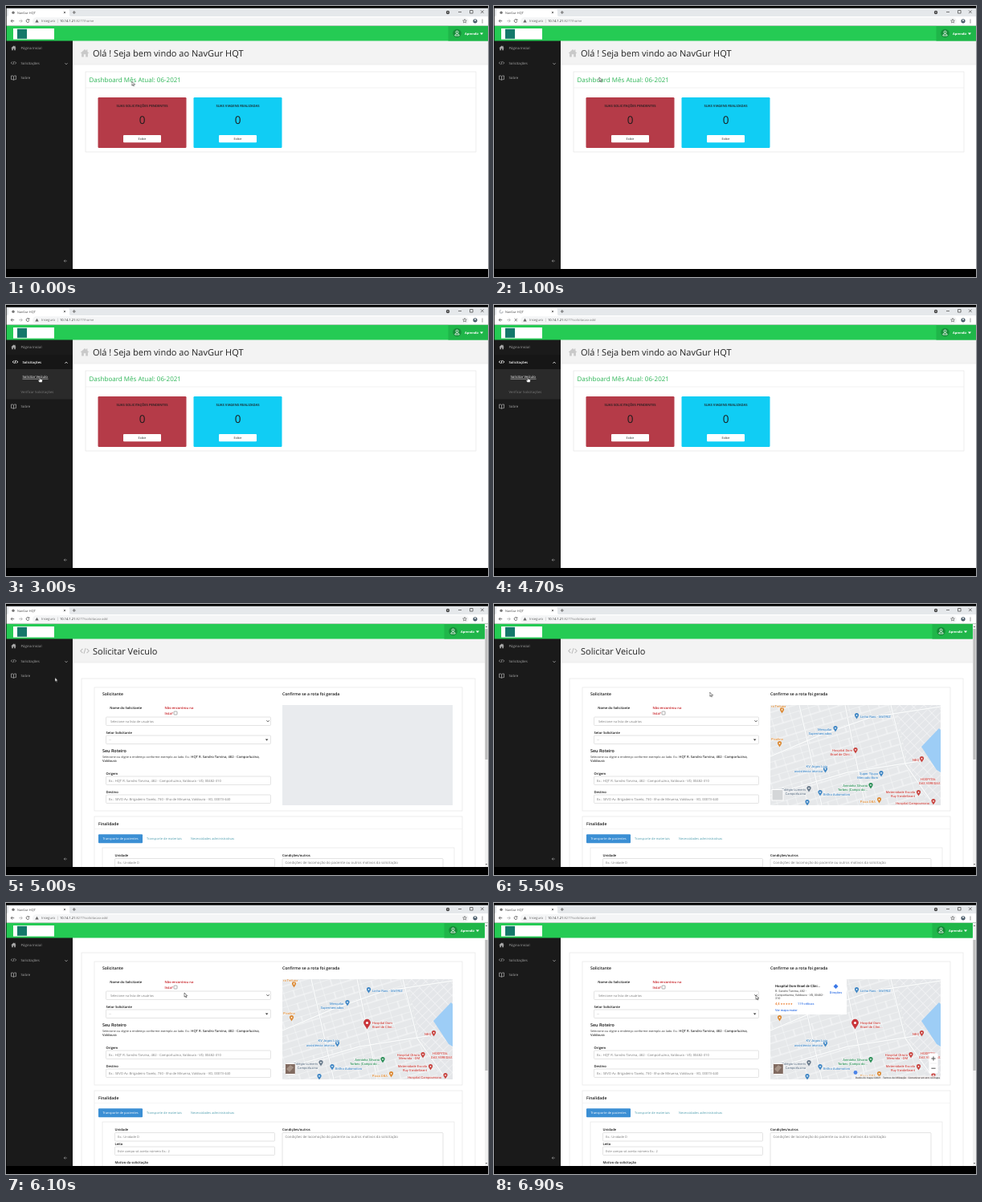
These frames come from a looping animation (600 px wide and 338 px high, 7 s). An HTML page:

```html
<!DOCTYPE html>
<html lang="pt-BR">
<head>
<meta charset="utf-8">
<title>NavGur HQT</title>
<style>
html, body { margin: 0; width: 100%; height: 100%; overflow: hidden; background: #000; }
svg { display: block; width: 600px; height: 338px; }
text { font: 4.3px "Open Sans", "Noto Sans", sans-serif; text-rendering: geometricPrecision; white-space: pre; }
.b { font-weight: 600; }
.mid { text-anchor: middle; }
.end { text-anchor: end; }
.h1 { font-size: 11px; fill: #222; }
.h2 { font-size: 8px; fill: #2cb556; }
.h3 { font-size: 5.1px; font-weight: 600; fill: #111; }
.label { font-size: 4.1px; font-weight: 600; fill: #111; }
.hint { font-size: 3.95px; fill: #777; }
.addr { font-size: 4.12px; }
.tiny { font-size: 3.75px; }
.box { fill: #fff; stroke: #d2d2d2; stroke-width: .6; }
.card { fill: #fff; stroke: #e8e8e8; stroke-width: .8; }
.line { fill: none; stroke: currentColor; stroke-width: .8; }
.map text { font: 500 4.1px Roboto, Arial, sans-serif; stroke: #fff; stroke-width: .6; paint-order: stroke; }
.map .flat text { stroke: none; }
.shop { fill: #3f86c4; } .health { fill: #c8433f; } .food { fill: #dc8a35; }
.park { fill: #2c8f58; } .school { fill: #66788a; }

/* hard state changes */
.home, .open, .rest, .hover, .sub0, .sub1, .load, .idle, .urlA, .urlB, .page, .mapOn,
.near, .far, .info, .ctrl, .hand, .arrow, .sobre, .shift, .user, .down, .up, .under
  { animation: 7s step-end infinite; }
.home { animation-name: home; }
.page { animation-name: page; }
.rest { animation-name: rest; }
.hover { animation-name: hover; }
.open { animation-name: open; }
.sobre { animation-name: sobre; }
.shift { animation-name: shift; }
.under { animation-name: under; }
.down { animation-name: down; }
.up { animation-name: up; }
.sub0 { animation-name: sub0; }
.sub1 { animation-name: sub1; }
.load { animation-name: load; }
.idle { animation-name: idle; }
.urlA { animation-name: urlA; }
.urlB { animation-name: urlB; }
.user { animation-name: user; }
.mapOn { animation-name: mapOn; }
.far { animation-name: far; }
.near { animation-name: near; }
.info { animation-name: info; }
.ctrl { animation-name: ctrl; }
.hand { animation-name: hand; }
.arrow { animation-name: arrow; }
@keyframes home { 0% { visibility: visible } 68.57% { visibility: hidden } }
@keyframes page { 0% { visibility: hidden } 68.57% { visibility: visible } }
@keyframes rest { 0% { visibility: visible } 20% { visibility: hidden } 68.57% { visibility: visible } }
@keyframes hover { 0% { visibility: hidden } 20% { visibility: visible } 68.57% { visibility: hidden } }
@keyframes open { 0% { visibility: hidden } 25.71% { visibility: visible } 68.57% { visibility: hidden } }
@keyframes sobre { 0% { transform: none } 25.71% { transform: translateY(37px) } 68.57% { transform: none } }
@keyframes shift { 0% { transform: translateX(2px) } 48.57% { transform: none } }
@keyframes under { 0% { visibility: hidden } 20% { visibility: visible } 31.42% { visibility: hidden } }
@keyframes down { 0% { visibility: hidden } 20% { visibility: visible } 27.14% { visibility: hidden } }
@keyframes up { 0% { visibility: hidden } 27.14% { visibility: visible } 68.57% { visibility: hidden } }
@keyframes sub0 { 0% { visibility: hidden } 25.71% { visibility: visible } 34.28% { visibility: hidden } }
@keyframes sub1 { 0% { visibility: hidden } 34.28% { visibility: visible } 68.57% { visibility: hidden } }
@keyframes load { 0% { visibility: hidden } 48.57% { visibility: visible } 71.42% { visibility: hidden } }
@keyframes idle { 0% { visibility: visible } 48.57% { visibility: hidden } 71.42% { visibility: visible } }
@keyframes urlA { 0% { visibility: visible } 48.57% { visibility: hidden } }
@keyframes urlB { 0% { visibility: hidden } 48.57% { visibility: visible } }
@keyframes user { 0% { transform: none } 68.57% { transform: translateX(-5px) } }
@keyframes mapOn { 0% { visibility: hidden } 74.28% { visibility: visible } }
@keyframes far { 0% { visibility: hidden } 74.28% { visibility: visible } 84.28% { visibility: hidden } }
@keyframes near { 0% { visibility: hidden } 84.28% { visibility: visible } }
@keyframes info { 0% { visibility: hidden } 91.42% { visibility: visible } }
@keyframes ctrl { 0% { visibility: hidden } 94.28% { visibility: visible } }
@keyframes hand { 0% { visibility: hidden } 18.57% { visibility: visible } 70% { visibility: hidden } }
@keyframes arrow { 0% { visibility: visible } 18.57% { visibility: hidden } 70% { visibility: visible } }

/* motion */
.scroll { animation: scroll 7s ease-out infinite; }
@keyframes scroll { 0%, 81.42% { transform: none } 84.28%, 100% { transform: translateY(-31px) } }
.thumb { animation: thumb 7s ease-out infinite; }
@keyframes thumb { 0%, 81.42% { transform: none } 84.28%, 100% { transform: translateY(15px) } }
.spin { transform-box: fill-box; transform-origin: center; animation: spin .9s linear infinite; }
@keyframes spin { to { transform: rotate(360deg) } }
.cursor { animation: move 7s ease-in-out infinite; }
@keyframes move {
  0%, 11.43% { transform: translate(156.5px, 94px) }
  20%, 24.5% { transform: translate(47px, 72px) }
  35.71%, 70% { transform: translate(42px, 90px) }
  77.14%, 81.42% { transform: translate(268.5px, 110px) }
  87.14%, 88.5% { transform: translate(222px, 112px) }
  95.71%, 97.2% { transform: translate(326px, 113px) }
  98.57%, 100% { transform: translate(326px, 115px) }
}
</style>
</head>
<body>
<svg viewBox="0 0 600 338">
<defs>
  <clipPath id="view"><rect x="83" y="43" width="513" height="285"/></clipPath>
  <clipPath id="mapBox"><rect x="344" y="126" width="212" height="125"/></clipPath>
  <pattern id="blocks" width="24" height="17" patternUnits="userSpaceOnUse" patternTransform="rotate(-17)">
    <path d="M0 0H24M0 0V17M13 0V9M0 9H24" fill="none" stroke="#f8f9fa" stroke-width="1"/>
  </pattern>
  <pattern id="slant" width="11" height="7" patternUnits="userSpaceOnUse" patternTransform="rotate(-44)">
    <rect width="11" height="7" fill="#e4e6e9"/>
    <path d="M0 0H11M0 0V7" stroke="#f8f9fa" stroke-width="1.2"/>
  </pattern>
  <g id="pin">
    <path d="M0 3.6C-.7 1.9-2.6 0-2.6-1.3a2.6 2.6 0 0 1 5.2 0C2.6 0 .7 1.9 0 3.6Z"/>
    <circle cy="-1.2" r=".9" fill="#fff"/>
  </g>
  <path id="roads" d="M344 190L405 164 470 141 556 128M380 126L408 251M344 238L440 210 530 196M437 126L462 251M494 126L512 200 548 251" fill="none"/>
  <path id="house" d="M0-5L-5.4 0h1.5V4.6H-1.2V1.2H1.2V4.6H3.9V0H5.4L3.4-1.9V-4.4H2V-3.2Z"/>
  <path id="code" d="M-2-2L-4 0-2 2M2-2L4 0 2 2M.8-2.6L-.8 2.6" fill="none"/>
  <path id="chev" d="M-1.5-.7L0 .8 1.5-.7" fill="none" stroke-width=".9"/>
</defs>

<rect width="600" height="338"/>
<rect y="43" x="83" width="517" height="285" fill="#fff"/>

<!-- dashboard -->
<g class="home">
  <rect x="83" y="43" width="517" height="30" fill="#f3f3f3"/>
  <path d="M83 73H600" stroke="#e4e4e4" stroke-width=".6"/>
  <use href="#house" x="98" y="59" fill="#c9c9c9"/>
  <text class="h1" x="108" y="63">Olá ! Seja bem vindo ao NavGur HQT</text>
  <rect class="card" x="99" y="82" width="486" height="100"/>
  <path d="M99 102H585" stroke="#e9e9e9" stroke-width=".6"/>
  <text class="h2" x="103.5" y="95">Dashboard Mês Atual: 06-2021</text>
  <rect x="114.5" y="114" width="110" height="63" rx="1.2" fill="#b53b48"/>
  <rect x="233.5" y="114" width="110" height="63" rx="1.2" fill="#10cdf4"/>
  <g class="mid" fill="#1c1c1c">
    <text class="b" x="169.5" y="126" style="font-size:4.15px">SUAS SOLICITAÇÕES PENDENTES</text>
    <text class="b" x="288.5" y="126" style="font-size:4.15px">SUAS VIAGENS REALIZADAS</text>
    <text x="169.5" y="146.8" style="font-size:13.5px">0</text>
    <text x="288.5" y="146.8" style="font-size:13.5px">0</text>
    <rect x="146" y="161" width="47" height="9.2" rx="1" fill="#fff"/>
    <rect x="265" y="161" width="47" height="9.2" rx="1" fill="#fff"/>
    <text class="tiny" x="169.5" y="167">Exibir</text>
    <text class="tiny" x="288.5" y="167">Exibir</text>
  </g>
</g>

<!-- request form -->
<g class="page">
  <g clip-path="url(#view)"><g class="scroll">
    <rect x="83" y="43" width="513" height="30" fill="#f3f3f3"/>
    <path d="M83 73H596" stroke="#e4e4e4" stroke-width=".6"/>
    <use href="#code" transform="translate(98 58.5) scale(1.3)" stroke="#bbb" stroke-width=".8"/>
    <text class="h1" x="108" y="63">Solicitar Veiculo</text>
    <rect class="card" x="94" y="93" width="490" height="320"/>
    <rect class="card" x="110" y="104" width="458" height="154"/>
    <rect class="card" x="110" y="265" width="458" height="140"/>

    <text class="h3" x="120" y="114">Solicitante</text>
    <text class="label" x="129.3" y="130.5">Nome do Solicitante</text>
    <text class="label" x="197.6" y="130.5" style="fill:#c4161c">Não encontrou na</text>
    <text class="label" x="197.6" y="137.5" style="fill:#c4161c">lista?</text>
    <rect x="209" y="134" width="4" height="4" rx=".6" fill="#fff" stroke="#777" stroke-width=".6"/>
    <rect class="box" x="124.5" y="141" width="205" height="10.5" rx="1"/>
    <text class="hint" x="130" y="148">Selecione na lista de usuários</text>
    <use href="#chev" x="326" y="146" stroke="#333"/>
    <text class="label" x="124.5" y="161.5">Setor Solicitante</text>
    <rect class="box" x="124.5" y="164" width="205" height="10.5" rx="1"/>
    <text class="hint" x="128" y="170">...</text>
    <path d="M322.8 168.6h3.6l-1.8 2z" fill="#333"/>
    <text class="h3" x="120" y="184.8" style="font-size:5.4px">Seu Roteiro</text>
    <text class="tiny" x="120" y="191.5" fill="#333">Selecione ou digite o endereço conforme exemplo ao lado. Ex.: <tspan class="b addr">HQT R. Sandro Tarvina, 482 - Camporluzina,</tspan></text>
    <text class="addr b" x="120" y="196.5" fill="#333">Valdoura</text>
    <text class="label" x="124.5" y="212.5">Origem</text>
    <rect class="box" x="124.5" y="215" width="205" height="10.5" rx="1"/>
    <text class="hint addr" x="128" y="221.7">Ex.: HQT R. Sandro Tarvina, 482 - Camporluzina, Valdoura - VD, 00482-310</text>
    <text class="label" x="124.5" y="235.7">Destino</text>
    <rect class="box" x="124.5" y="238" width="205" height="10.5" rx="1"/>
    <text class="hint addr" x="128" y="244.7">Ex.: SEVO Av. Brigadeiro Tavelo, 730 - Ilha de Miruena, Valdoura - VD, 00073-440</text>

    <text class="h3" x="344" y="114">Confirme se a rota foi gerada</text>
    <rect x="344" y="126" width="212" height="125" fill="#e9ebee"/>
    <g class="mapOn map" clip-path="url(#mapBox)">
      <rect x="344" y="126" width="212" height="125" fill="#e6e8ea"/>
      <rect x="344" y="126" width="212" height="125" fill="url(#blocks)"/>
      <path d="M500 126H556V251H540L514 196Z" fill="url(#slant)"/>
      <use href="#roads" stroke="#d6dade" stroke-width="1.9"/>
      <use href="#roads" stroke="#fafbfb" stroke-width="1.4"/>
      <path d="M532 178L554 155 556 157V210L551 207Z" fill="#9dcdf6"/>
      <g class="food">
        <use href="#pin" x="358.5" y="133"/><use href="#pin" x="355.5" y="175"/><use href="#pin" x="479.5" y="245"/>
        <text x="345" y="129">ra Trelupa</text>
        <text x="345" y="170">Picolina</text>
        <text class="end" x="475" y="248">Pizza OBA</text>
      </g>
      <g class="shop">
        <use href="#pin" x="451.5" y="140"/><text x="456" y="142">Linho Raro - MATRIZ</text>
        <use href="#pin" x="425" y="156"/>
        <text class="end" x="420.5" y="158">Merquilar</text><text class="end" x="420.5" y="162.5">Supermercados</text>
        <use href="#pin" x="412.5" y="207"/>
        <text class="end" x="415" y="203.5">KV Jogos Loja</text><text class="end" x="409" y="210">assistência técnica</text>
        <use href="#pin" x="406" y="236"/><text x="410" y="239">Brilho Automotivo</text>
        <use href="#pin" x="390" y="248"/>
      </g>
      <g class="school">
        <use href="#pin" x="392" y="231"/>
        <text class="end" x="388" y="233">Colégio Lumeris</text><text class="end" x="388" y="237.5">Camporluzina</text>
      </g>
      <g class="park">
        <use href="#pin" x="469" y="227"/>
        <text class="end" x="465" y="228">Areninha Silvano</text><text class="end" x="465" y="232.5">Torbes (Campo do...</text>
      </g>
      <g class="health">
        <use href="#pin" x="532.5" y="194"/><text class="end" x="529" y="195.5">NEQ</text>
        <text x="531" y="220">HOSPITAL</text><text x="529" y="224.5">DAS VEREDAS</text>
        <use href="#pin" x="528.5" y="236"/>
        <text class="end" x="524" y="236">Maternidade Escola</text><text class="end" x="524" y="240.5">Ruy Vandelbrant</text>
        <use href="#pin" x="547" y="247"/><text class="end" x="542" y="249.5">Hospital Campoverano</text>
      </g>
      <g class="far">
        <g class="health">
          <use href="#pin" x="450" y="183"/>
          <text class="end" x="446" y="184">Hospital Dom</text><text class="end" x="446" y="188.5">Brael de Clíni...</text>
        </g>
        <g class="shop"><use href="#pin" x="482" y="212"/>
          <text class="end" x="478" y="213">Super Tijupa</text><text class="end" x="478" y="217.5">Mercado Bom</text>
        </g>
        <rect x="346" y="231.5" width="14" height="13.5" fill="#d4d6d8" stroke="#fff"/>
      </g>
      <g class="near">
        <g class="health">
          <use href="#pin" transform="translate(449.5 182.5) scale(1.7)" fill="#c9353a"/>
          <text x="456" y="182">Hospital Dom</text><text x="456" y="187">Brael de Clíni...</text>
          <use href="#pin" x="519" y="221"/>
          <text class="end" x="515" y="221.5">Hospital Otávio</text><text class="end" x="515" y="226">Merunda - OM</text>
        </g>
        <rect x="347.3" y="231.5" width="13" height="13" rx="1" fill="#806a60" stroke="#fff"/>
        <path d="M349 238l5-5 4 3-5 6z" fill="#a79488"/>
      </g>
      <g class="info flat">
        <rect x="344" y="126" width="95" height="44" fill="#fff"/>
        <text x="350" y="136" fill="#111" style="font-size:4.3px">Hospital Dom Brael de Clíni...</text>
        <g fill="#666">
          <text x="350" y="142" style="font-size:3.7px">R. Sandro Tarvina, 482 -</text>
          <text x="350" y="146.7" style="font-size:3.7px">Camporluzina, Valdoura - VD, 00482-</text>
          <text x="350" y="151.4" style="font-size:3.7px">310</text>
        </g>
        <text x="350" y="158" fill="#e7711b">4,4 <tspan style="font-size:3.4px">★★★★★</tspan></text>
        <g fill="#3b78e7">
          <text x="378" y="158" style="font-size:3.9px">119 críticas</text>
          <text x="350" y="166" style="font-size:3.9px">Ver mapa maior</text>
          <path d="M425.5 132l3 3-3 3-3-3z"/>
          <text class="mid" x="425.5" y="144" style="font-size:3.9px">Direções</text>
        </g>
      </g>
      <g class="ctrl flat">
        <rect x="541.5" y="218.5" width="11" height="25" rx=".8" fill="#fff"/>
        <path d="M543 231H551" stroke="#ddd" stroke-width=".5"/>
        <path d="M544.4 225h5.2M547 222.4v5.2M544.4 237.2h5.2" stroke="#555" stroke-width="1"/>
        <circle cx="450" cy="242.5" r="2.4" fill="#4a83e8"/>
        <rect x="445" y="246.5" width="111" height="4.5" fill="#f5f5f5" opacity=".85"/>
        <text class="end" x="555" y="250" fill="#444" style="font-size:3.1px">Dados do mapa ©2021   Termos de Utilização   Comunicar um erro no mapa</text>
      </g>
    </g>

    <text class="h3" x="115" y="275.5">Finalidade</text>
    <path d="M110 280.5H568" stroke="#eee" stroke-width=".6"/>
    <rect x="115" y="287.2" width="55" height="11" rx="1" fill="#3b8fd4"/>
    <g class="b">
      <text class="hint mid" x="142.5" y="294.2" style="fill:#fff">Transporte de pacientes</text>
    </g>
    <text class="hint" x="175" y="294.2" style="fill:#4c9cad">Transporte de materiais</text>
    <text class="hint" x="230" y="294.2" style="fill:#4c9cad">Necessidades administrativas</text>
    <rect class="card" x="120" y="304" width="438" height="90"/>
    <text class="label" x="135.5" y="315">Unidade</text>
    <rect class="box" x="135.5" y="317.5" width="199" height="10.5" rx="1"/>
    <text class="hint" x="139" y="324.3">Ex.: Unidade D</text>
    <text class="label" x="135.5" y="332.7">Leito</text>
    <rect class="box" x="135.5" y="335" width="199" height="10.5" rx="1"/>
    <text class="hint" x="139" y="341.8">Este campo só aceita número Ex.: 2</text>
    <text class="label" x="135.5" y="356">Motivo da solicitação</text>
    <text class="label" x="344" y="315">Condições/outros</text>
    <rect class="box" x="344" y="317.5" width="200" height="60" rx="1"/>
    <text class="hint" x="347.5" y="324.3" style="font-size:4.3px">Condições de locomoção do paciente ou outros motivos da solicitação</text>
  </g></g>
</g>

<!-- sidebar -->
<rect y="43" width="83" height="285" fill="#1a1a1a"/>
<g fill="#a9a9a9">
  <use href="#house" transform="translate(9.5 52.5) scale(.6)"/>
  <text x="18.5" y="54">Página Inicial</text>
</g>
<g class="rest">
  <use href="#code" transform="translate(9.5 71) scale(.8)" stroke="#a9a9a9" stroke-width=".9"/>
  <text x="18.5" y="72.5" fill="#a9a9a9">Solicitações</text>
  <use href="#chev" x="75" y="72" stroke="#a9a9a9"/>
</g>
<g class="hover">
  <rect y="62" width="83" height="18" fill="#161616"/>
  <g class="shift">
    <use href="#code" transform="translate(9.5 71) scale(.8)" stroke="#fff" stroke-width="1.2"/>
    <text class="b" x="18.5" y="72.5" fill="#fff" style="font-size:4.2px">Solicitações</text>
  </g>
</g>
<path class="under" d="M20.5 73.6H45" stroke="#fff" stroke-width=".5"/>
<use class="down" href="#chev" x="75" y="72" stroke="#fff"/>
<use class="up" href="#chev" transform="translate(75 72) scale(1 -1)" stroke="#fff"/>
<g class="open">
  <rect y="80" width="83" height="37.5" fill="#2a2a2a"/>
  <text x="18.5" y="109.5" fill="#7b7b7b">Verificar Solicitações</text>
</g>
<text class="sub0" x="18.5" y="91" fill="#7b7b7b">Solicitar Veículo</text>
<g class="sub1">
  <text x="20.5" y="91" fill="#fff">Solicitar Veículo</text>
  <path d="M20.5 92.2H52.5" stroke="#fff" stroke-width=".5"/>
</g>
<g class="sobre" color="#a9a9a9">
  <path class="line" d="M9.5 87.8C8.5 86.8 7.5 87 6.6 87v4.6c1 0 2 0 2.9.8 .9-.8 1.9-.8 2.9-.8V87c-1 0-2-.2-2.9.8v4.4"/>
  <text x="18.5" y="91" fill="#a9a9a9">Sobre</text>
</g>
<path d="M75.8 318H72.2M73.7 316.5L72.2 318l1.5 1.5" fill="none" stroke="#999" stroke-width=".7"/>

<!-- header -->
<rect y="24.6" width="600" height="18.9" fill="#25cb54"/>
<rect x="9" y="28" width="51" height="13.6" fill="#fff"/>
<rect x="14" y="28.8" width="12" height="12" fill="#14786a"/>
<g class="user">
  <rect x="550.5" y="24.6" width="50" height="18.9" fill="#1fb649"/>
  <circle cx="561.5" cy="34" r="5.3" fill="#178d39"/>
  <circle cx="561.5" cy="32.6" r="1.5" fill="none" stroke="#fff" stroke-width=".8"/>
  <path d="M558.8 37c.3-3 5.1-3 5.4 0z" fill="none" stroke="#fff" stroke-width=".8"/>
  <text x="571" y="35.8" fill="#fff" style="font-size:3.9px;font-weight:700">Aprendiz</text>
  <path d="M590 33.4h4l-2 2.5z" fill="#fff"/>
</g>
<g class="page">
  <rect x="596" y="25" width="4" height="303" fill="#f1f1f1"/>
  <path d="M596.8 29h2.4l-1.2-1.5zM596.8 324h2.4l-1.2 1.5z" fill="#555"/>
  <rect class="thumb" x="596.4" y="31" width="3.2" height="163" fill="#bdbdbd"/>
</g>

<!-- browser -->
<rect y="2.7" width="600" height="10.3" fill="#e5e8eb"/>
<rect y="13" width="600" height="11.7" fill="#fff"/>
<path d="M1 13C2.5 13 3 12 3 11V6Q3 4 5 4H77Q79 4 79 6V11C79 12 79.5 13 81 13Z" fill="#fff"/>
<circle class="idle" cx="9" cy="8.2" r="1.7" fill="#777"/>
<g class="load"><path class="spin" d="M9 6.2a2 2 0 1 1-2 2" fill="none" stroke="#7a8088" stroke-width=".7"/></g>
<text x="14" y="9.7" fill="#444" style="font-size:3.9px">NavGur HQT</text>
<g class="line" color="#555">
  <path d="M71.8 7l2.2 2.2M74 7l-2.2 2.2M82.8 8h4M84.8 6v4"/>
  <path d="M563 7.5h4M577.5 5.5h3.6v3.6h-3.6zM591 5.5l3.6 3.6M594.6 5.5L591 9.1"/>
  <path d="M10.2 18.7H6.2M8 16.8L6.1 18.7 8 20.6"/>
  <path d="M16.2 18.7h4M18.4 16.8l1.9 1.9-1.9 1.9" stroke="#aaa"/>
</g>
<circle cx="550" cy="8" r="2.2" fill="#444"/>
<path d="M549 7.5h2l-1 1.3z" fill="#fff"/>
<path class="idle line" color="#555" d="M28.6 17.4a1.9 1.9 0 1 0 .3 1.7M28.9 16.4v1.4h-1.4"/>
<path class="load line" color="#555" d="M25.6 17l3.2 3.2M28.8 17l-3.2 3.2"/>
<rect x="33" y="14.3" width="543" height="9.4" rx="4.7" fill="#f4f5f6"/>
<path d="M38.5 16.8l2.2 3.8h-4.4z" fill="#666"/>
<text x="44" y="20.3" fill="#666" style="font-size:4.2px">Inseguro</text>
<path d="M64.4 16.5v4.5" stroke="#bbb" stroke-width=".5"/>
<text x="67" y="20.3" fill="#222" style="font-size:4.05px">10.14.1.21<tspan class="urlA" fill="#777">:8277/home</tspan></text>
<text class="urlB" x="67" y="20.3" fill="#777" style="font-size:4.05px"><tspan visibility="hidden">10.14.1.21</tspan>:8277/solicitacao-add</text>
<path class="line" color="#555" style="stroke-width:.6" d="M571 16.4l.7 1.6 1.7.1-1.3 1.1.4 1.7-1.5-.9-1.5.9.4-1.7-1.3-1.1 1.7-.1z"/>
<circle cx="584" cy="18.8" r="2.6" fill="#4b5d6b"/>
<circle cx="584" cy="18" r=".9" fill="#fff"/>
<g fill="#555"><circle cx="593" cy="17" r=".6"/><circle cx="593" cy="18.9" r=".6"/><circle cx="593" cy="20.8" r=".6"/></g>
<rect width=".6" height="338"/>

<!-- pointer -->
<g class="cursor" stroke="#111" stroke-width=".5" fill="#fff" stroke-linejoin="round">
  <path class="arrow" d="M0 0V5.2L1.2 4.1 2.1 6 2.9 5.6 2.1 3.8H3.7Z"/>
  <path class="hand" d="M-.6 .5Q0-.4.6.5V2.4L2.9 2.9Q3.6 3.1 3.4 4L2.9 6.6H-.4L-2.2 4.1Q-2.1 3.2-.6 4.1Z"/>
</g>
<rect y="328" width="600" height="10"/>
</svg>
</body>
</html>
```
